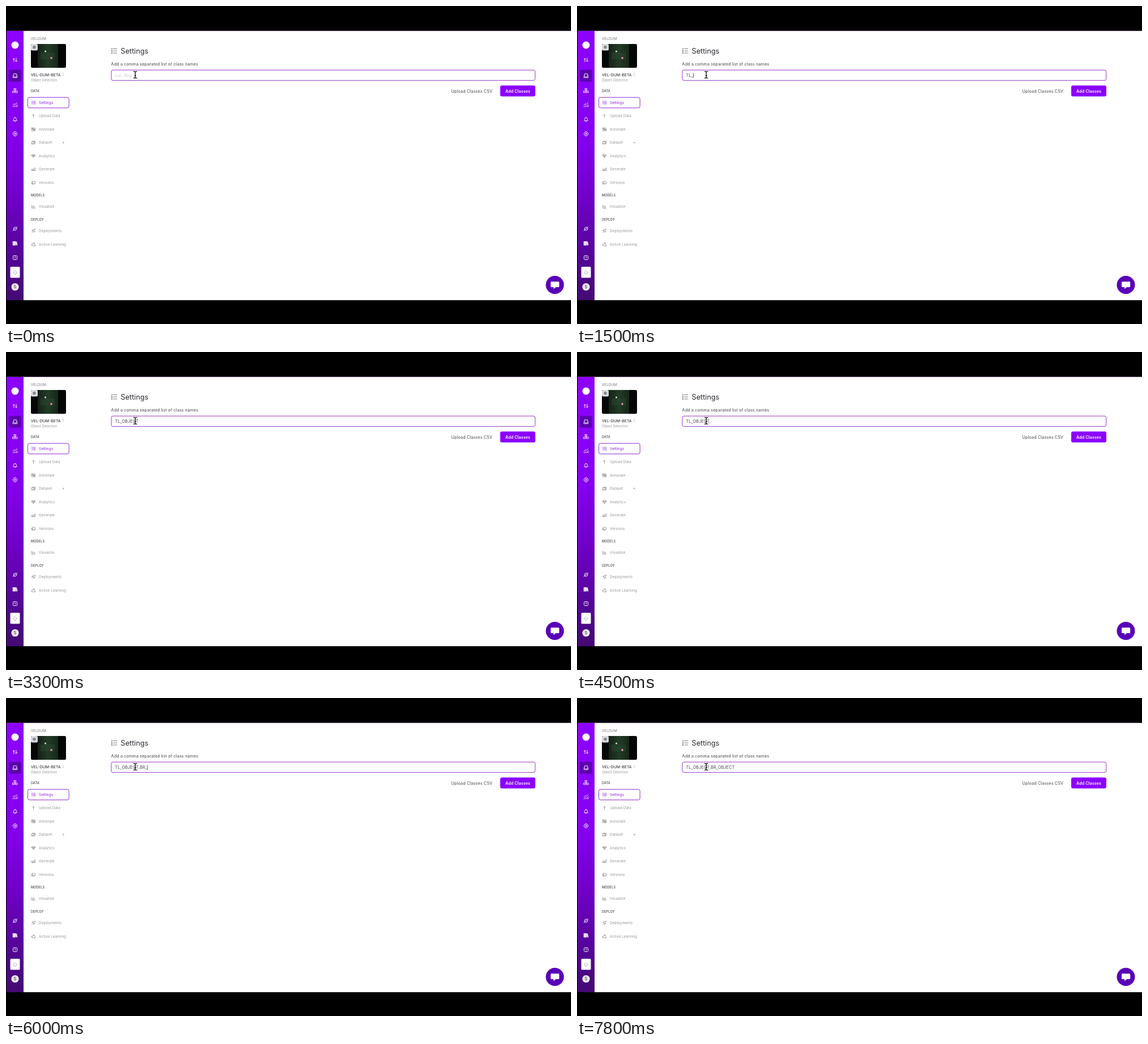
Animation of 998x561 px, one loop 8000 ms. Source, as an HTML page:

```html
<!DOCTYPE html>
<html lang="en">
<head>
<meta charset="utf-8">
<title>Class settings</title>
<style>
  html, body { margin: 0; width: 100%; height: 100%; overflow: hidden; background: #000; }
  svg { display: block; }
  text { font-family: Inter, Roboto, sans-serif; letter-spacing: .012em; fill: #96969c; }
  .icon { fill: none; stroke: #8c8c94; stroke-width: .8; stroke-linejoin: round; stroke-linecap: round; }
  .side { stroke: #f3eaff; stroke-width: 1; }
  .side .solid { fill: #f3eaff; }
  .on { stroke: #8b1be0; }
  .nav { font-size: 6.35px; }
  .head { font-size: 5.6px; font-weight: 500; fill: #46464d; letter-spacing: .02em; }
  .body { font-size: 7.25px; fill: #46464d; letter-spacing: .017em; }
</style>
</head>
<body>
<svg width="998" height="561" viewBox="0 0 998 561">
  <defs>
    <linearGradient id="bar" x1="0" y1="0" x2="0" y2="1">
      <stop offset="0" stop-color="#8d02ff"/>
      <stop offset=".4" stop-color="#8400ef"/>
      <stop offset=".62" stop-color="#7000c8"/>
      <stop offset=".85" stop-color="#520694"/>
      <stop offset="1" stop-color="#440a72"/>
    </linearGradient>
    <linearGradient id="photo">
      <stop offset="0" stop-color="#142117"/>
      <stop offset=".5" stop-color="#233b27"/>
      <stop offset="1" stop-color="#172719"/>
    </linearGradient>
    <clipPath id="thumb"><rect x="44" y="67" width="62" height="42" rx="2.5"/></clipPath>
  </defs>

  <rect width="998" height="561"/>
  <rect x="1" y="44" width="997" height="475" fill="#fff"/>
  <rect x="1" y="43.2" width="997" height=".9" fill="#3d2b4a"/>
  <rect x="1" y="44" width="30" height="475" fill="url(#bar)"/>

  <!-- sidebar -->
  <circle cx="16" cy="69" r="6.5" fill="#fff"/>
  <rect x="5" y="112.500" width="22" height="21" rx="2.500" fill="#5c00ad"/>
  <g class="icon side">
    <path d="M14 98.500v-6m-1.800 1.800 1.800-1.800 1.500 1.500M18 92v6m-1.500-1.500 1.500 1.500 1.800-1.800"/>
    <path d="M12.500 124l1-4.300h5l1 4.300v2.500h-7zh2l.8 1.200h1.600l.6-1.200h2"/>
    <path d="M14.500 145.500h3v2.500h-3zM12 150h3v2.800h-3zM17 150h3v2.800h-3zM16 148v2"/>
    <path d="M12.300 174.500l2.200-2 2 1 3.200-2.800M12.500 178v-1.200M14.800 178v-2.700M17.200 178v-2M19.500 178v-3.800"/>
    <path d="M12.800 202c.8-.8.8-1.500.8-2.700a2.400 2.400 0 0 1 4.800 0c0 1.200 0 1.900.8 2.700zM15.300 203.300h1.400M16 196.200v.6"/>
    <path d="M14.700 221.900h2.600l.5 1.200 1.300.6.7 1.800-.7 1.800-1.300.6-.5 1.200h-2.600l-.5-1.200-1.300-.6-.7-1.800.7-1.800 1.300-.6z"/>
    <circle cx="16" cy="225.500" r="1.200"/>
    <path d="M14 395a2.800 2.800 0 0 1 0-4 2.800 2.800 0 0 1 4 0 2.800 2.800 0 0 1-4 4zM12.500 396.500c-.5-1 1-2 3.500-3.500s3.500-3 3.500-3.500"/>
    <path class="solid" d="M12.500 415.500h1.500v6.500h-1.500zM15 415.500h1.700v6.500H15zM17.600 416l1-.2 1.200 6-1.200.2z"/>
    <rect x="12.500" y="440.500" width="7" height="7" rx="1"/>
    <path d="M15 443.100c.2-1.300 2.200-1 2.100.2 0 .8-1.100.7-1.100 1.500M16 446v.1"/>
  </g>
  <rect x="7.500" y="460" width="17" height="19.500" rx="1.500" fill="#fff"/>
  <path class="icon" d="M13.200 469a3 3 0 1 0 5.600 0M16 466.800v.2M14.200 467.500v.1M16 469.800l1-1" stroke-width=".7"/>
  <circle cx="16" cy="495.500" r="6.600" fill="#efe7f6"/>
  <text x="16" y="498.200" text-anchor="middle" style="font-size:7.300px;font-weight:500;fill:#40384a">S</text>

  <!-- project -->
  <text x="44" y="60" style="font-size:6.200px;fill:#77777e">VELDUM</text>
  <g clip-path="url(#thumb)">
    <rect x="44" y="67" width="62" height="42" fill="#050706"/>
    <rect x="56" y="67" width="36" height="42" fill="url(#photo)"/>
    <rect x="61" y="82" width="25" height="12" fill="#2c4730" opacity=".5"/>
    <circle cx="69.500" cy="80" r="1.500" fill="#d8e6d9"/>
    <circle cx="80" cy="91.700" r="2" fill="#d5688f"/>
    <circle cx="80" cy="91.700" r=".8" fill="#f3c4d5"/>
    <rect x="44" y="67" width="12" height="11.500" rx="2" fill="#d9dadd"/>
  </g>
  <circle cx="50" cy="72.600" r="2.600" fill="#77777e"/>
  <path d="M47.500 72.600h5M50 70v5.200" stroke="#b9b9be" stroke-width=".4"/>
  <text x="44" y="123.500" style="font-size:6.750px;font-weight:500;fill:#3d3d44">VEL-DUM-BETA</text>
  <g fill="#77777e"><circle cx="101" cy="118.800" r=".5"/><circle cx="101" cy="120.700" r=".5"/><circle cx="101" cy="122.600" r=".5"/></g>
  <text x="44" y="133.200" style="font-size:5.700px">Object Detection</text>

  <!-- navigation -->
  <text class="head" x="44" y="152.300">DATA</text>
  <text class="head" x="44" y="336">MODELS</text>
  <text class="head" x="44" y="378.700">DEPLOY</text>
  <rect x="38.500" y="161.200" width="72.700" height="18.600" rx="3" fill="#fff" stroke="#8f2bd6"/>
  <g id="nav"></g>
  <path d="M101.300 239.200v3.400M99.600 240.900h3.400M100.100 239.700l2.400 2.400M102.500 239.700l-2.400 2.400" stroke="#a8a8ae" stroke-width=".6"/>

  <!-- settings form -->
  <path class="icon" d="M189.800 75.500h6M189.800 79.200h6M189.800 82.900h6M186.500 75l.8-.6v2.400M186.300 78.400h1.300l-1.300 1.700h1.500M186.300 82h1.400l-.8.900c1.200 0 1 1.300-.6 1" style="stroke:#55555c"/>
  <text x="202.500" y="83.700" style="font-size:12.700px;fill:#2c2c33;letter-spacing:0">Settings</text>
  <text class="body" x="185.500" y="105.300">Add a comma separated list of class names</text>
  <rect x="186" y="113" width="748.700" height="18.300" rx="2.800" fill="#fff" stroke="#9a35c9"/>
  <text class="body" id="hint" x="192.500" y="125" style="fill:#cfcfd4">cat, dog</text>
  <text class="body" id="entry" x="192.500" y="125"></text>
  <rect id="caret" y="118.300" width=".8" height="8.400" fill="#34343a"/>
  <path d="M225 115.400c1.800 0 3.300.3 3.300 1.300v9.200c0 1-1.500 1.300-3.300 1.300M231.600 115.400c-1.800 0-3.300.3-3.300 1.300v9.200c0 1 1.500 1.300 3.300 1.300M226.800 122.700h3" fill="none" stroke="#101014" stroke-width="1.300"/>
  <text class="body" x="786.500" y="152.500">Upload Classes CSV</text>
  <rect x="873" y="140.200" width="62" height="19.200" rx="3" fill="#8b00ff"/>
  <text x="904" y="152.500" text-anchor="middle" style="font-size:7.150px;font-weight:600;fill:#fff">Add Classes</text>

  <!-- chat -->
  <circle cx="969.500" cy="492" r="16" fill="#5900b8"/>
  <path d="M963.500 486.300h12.300q1.400 0 1.400 1.400v7q0 1.400-1.400 1.400h-4.600l-4 3.200v-3.200h-3.700q-1.400 0-1.400-1.400v-7q0-1.400 1.400-1.400z" fill="#fff"/>
</svg>
<script>
  const byId = id => document.getElementById(id);

  // label, centre y, icon path around (0, 0)
  const rows = [
    ['Settings', 170.5, 'M-.5-2.300h4M-.5 0h4M-.5 2.300h4M-3-2.600l.6-.3v1.500M-3 .2h1M-3 2.300h1'],
    ['Upload Data', 194, 'M0 2.800v-5.600M-2-.8l2-2 2 2'],
    ['Annotate', 217.5, 'M-3-2.500h6v5h-6zM-1.600-1.200h2.200v1.600h-2.200zM-.2-.2h2v1.600h-2zM-3-2.500l6 5'],
    ['Dataset', 241, 'M-2-2.700h4.500q.7 0 .7.700v3M-3-1.500h5v4h-5zM-2.500 2l1.600-1.700 1 1 .8-.8 1 1.500'],
    ['Analytics', 264.5, 'M-2-2.500h4l1.300 1.600-3.300 3.700-3.300-3.700zM-3.300-.9h6.600M-1.200-.9l1.200 3.700 1.200-3.700'],
    ['Generate', 288, 'M-3-.5v3h6v-5M-3 1l2-1.500 1.500.8 2.300-2.700M-1 2.500v-1.600M1 2.500v-1.800'],
    ['Versions', 311.5, 'M-1.600-2.500h1.600l.8.800h2.400v3.200h-4.800zM-3-1v3.700h5'],
    ['Visualize', 354, 'M-3-2.800v5.600h6M-1.200 1.200v-2M.5 1.200v-3.200M2.100 1.200v-1.200'],
    ['Deployments', 396.700, 'M3-3c-2.200 0-3.500 1-4.300 2.800l1.500 1.500c1.800-.8 2.800-2.100 2.800-4.300zM-1.300-.2h-1.500l1-1.600h1.500M.2 1.300v1.500l1.600-1v-1.500M-2.800 2.800l1-1'],
    ['Active Learning', 420.300, 'M-1.500-1.200l1.500-2 1.500 2M2.200-.2l1.100 2-.6 1h-1.900M-.6 2.800h-2.100l-.6-1 1.100-2M1.600-2.400v1.300h-1.300M1.600 2l-.8.800.8.800M-3.200.3l1-.5.5 1']
  ];
  byId('nav').innerHTML = rows.map(([label, y, d], i) => `
    <path class="icon${i ? '' : ' on'}" transform="translate(48.500 ${y})" d="${d}"/>
    <text class="nav" x="58" y="${y + 2.200}"${i ? '' : ' style="fill:#8b1be0"'}>${label}</text>`).join('');

  const LOOP = 8000;
  const PHRASE = 'TL_OBJECT,BR_OBJECT';
  const keyTimes = [300, 450, 1200, 1700, 1900, 2100, 2200, 2400, 2600, 3500,
                    5000, 5100, 5700, 6400, 6600, 6800, 6850, 7000, 7200];
  const caretHidden = [[0, 100], [3100, 3500], [4000, 4600], [7700, LOOP]];

  const entry = byId('entry'), hint = byId('hint'), caret = byId('caret');
  let shown = -1;

  function draw(now) {
    const t = now % LOOP;
    const count = keyTimes.filter(k => k <= t).length;
    if (count !== shown) {
      entry.textContent = PHRASE.slice(0, count);
      hint.style.display = count ? 'none' : '';
      shown = count;
    }
    const width = count ? entry.getComputedTextLength() : 0;
    caret.setAttribute('x', 192.500 + width);
    const hidden = caretHidden.some(([from, to]) => t >= from && t < to);
    caret.style.display = hidden ? 'none' : '';
    requestAnimationFrame(step);
  }

  let start = null;
  function step(now) {
    start ??= now;
    draw(now - start);
  }
  draw(0);
</script>
</body>
</html>
```
